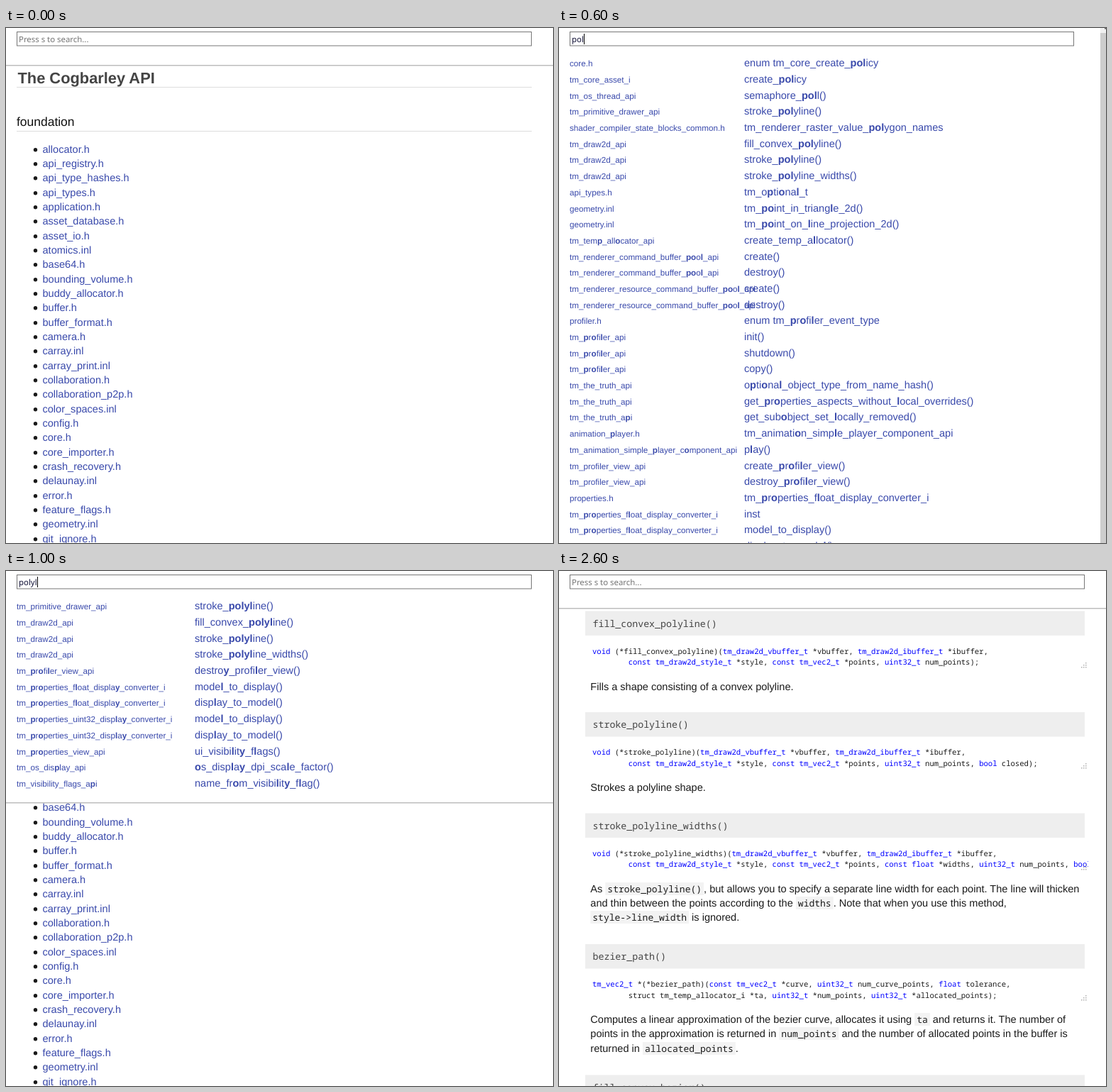
An HTML page that plays this animation: 771 by 726 pixels, repeating every 4600 ms.

```html
<!DOCTYPE html>
<html lang="en">
<head>
<meta charset="utf-8">
<title>API search</title>
<style>
html, body { margin: 0; width: 100%; height: 100%; overflow: hidden; background: #fff; }
svg { display: block; }
text { font: 14.56px "Liberation Sans", Arial, sans-serif; white-space: pre; text-rendering: geometricPrecision; fill: #1a1a1a; }
.link, .small { fill: #3949ab; }
.small { font-size: 11.68px; }
.title { font-size: 21.84px; font-weight: 700; fill: #444; }
.section { font-size: 17.47px; fill: #111; }
.field { font: 11.4px "Noto Sans", "Open Sans", sans-serif; fill: #15153a; }
.hint { fill: #757575; }
.head, .code, .inline { font-family: "Noto Sans Mono", "DejaVu Sans Mono", monospace; }
.head { font-size: 13.28px; fill: #444; }
.code { font-size: 10.575px; }
.inline { font-size: 13.03px; }
.type { fill: #00f; }
.hit { font-weight: 700; }
</style>
</head>
<body>
<svg id="stage" width="771" height="726" viewBox="0 0 771 726">
<defs><clipPath id="codeClip"><rect width="746" height="726"/></clipPath></defs>
<g id="view"></g>
</svg>
<script>
const view = document.getElementById("view");
const LOOP = 4600;

const files = `allocator.h api_registry.h api_type_hashes.h api_types.h application.h
asset_database.h asset_io.h atomics.inl base64.h bounding_volume.h buddy_allocator.h buffer.h
buffer_format.h camera.h carray.inl carray_print.inl collaboration.h collaboration_p2p.h
color_spaces.inl config.h core.h core_importer.h crash_recovery.h delaunay.inl error.h
feature_flags.h geometry.inl git_ignore.h`.split(/\s+/);

// Each line: owner|symbol|symbol...
const results = {
p: `allocator.h|tm_temp_allocator_i
tm_temp_allocator_api|create_temp_allocator()|printf()
api_registry.h|tm_api_registry_api
tm_api_registry_api|implementation()|first_implementation()|next_implementation()
api_types.h|tm_optional_t
application.h|tm_application_api
tm_application_api|application()|update_loop()
atomics.inl|atomic_exchange_pointer()|atomic_compare_exchange_weak_pointer()
carray.inl|tm_carray_push()|tm_carray_pop()|tm_carray_temp_push()
carray_print.inl|tm_carray_printf()|tm_carray_temp_printf()
core.h|enum tm_core_create_policy
tm_core_asset_i|create_policy
geometry.inl|tm_point_segment_distance_2d()|tm_point_in_triangle_2d()|tm_point_distance_2d()|tm_point_on_line_projection_2d()
tm_os_file_io_api|open_input()|open_output()|set_position()
tm_os_thread_api|semaphore_poll()|sleep()|processor_id()`,
po: `atomics.inl|atomic_exchange_pointer()|atomic_compare_exchange_weak_pointer()
carray.inl|tm_carray_pop()
core.h|enum tm_core_create_policy
tm_core_asset_i|create_policy
geometry.inl|tm_point_segment_distance_2d()|tm_point_in_triangle_2d()|tm_point_distance_2d()|tm_point_on_line_projection_2d()
tm_os_file_io_api|set_position()
tm_os_thread_api|semaphore_poll()
tm_the_truth_common_types_api|get_position()|set_position()
animation_blender.h|tm_animation_pose_t
tm_animation_blender_api|play_pose()|update_pose()|blend_compute_pose()|blend_pose()
animation_player.h|tm_animation_player_playing_o
tm_animation_state_machine_api|pose()
mixer.h|enum tm_mixer_positioning_enum|tm_mixer_positioning_2d_t|tm_mixer_positioning_3d_t|tm_mixer_positioning_matrix_t|tm_mixer_positioning_t
tm_mixer_api|positioning()|set_positioning()
tm_properties_view_api|ui_uint32_popup_picker()|ui_uint64_popup_picker()|ui_reference_popup_picker()|ui_string_popup_picker()`,
pol: `core.h|enum tm_core_create_policy
tm_core_asset_i|create_policy
tm_os_thread_api|semaphore_poll()
tm_primitive_drawer_api|stroke_polyline()
shader_compiler_state_blocks_common.h|tm_renderer_raster_value_polygon_names
tm_draw2d_api|fill_convex_polyline()|stroke_polyline()|stroke_polyline_widths()
api_types.h|tm_optional_t
geometry.inl|tm_point_in_triangle_2d()|tm_point_on_line_projection_2d()
tm_temp_allocator_api|create_temp_allocator()
tm_renderer_command_buffer_pool_api|create()|destroy()
tm_renderer_resource_command_buffer_pool_api|create()|destroy()
profiler.h|enum tm_profiler_event_type
tm_profiler_api|init()|shutdown()|copy()
tm_the_truth_api|optional_object_type_from_name_hash()|get_properties_aspects_without_local_overrides()|get_subobject_set_locally_removed()
animation_player.h|tm_animation_simple_player_component_api
tm_animation_simple_player_component_api|play()
tm_profiler_view_api|create_profiler_view()|destroy_profiler_view()
properties.h|tm_properties_float_display_converter_i
tm_properties_float_display_converter_i|inst|model_to_display()|display_to_model()`,
poly: `tm_primitive_drawer_api|stroke_polyline()
shader_compiler_state_blocks_common.h|tm_renderer_raster_value_polygon_names
tm_draw2d_api|fill_convex_polyline()|stroke_polyline()|stroke_polyline_widths()
core.h|enum tm_core_create_policy
tm_core_asset_i|create_policy
tm_renderer_command_buffer_pool_api|destroy()
tm_renderer_resource_command_buffer_pool_api|destroy()
profiler.h|enum tm_profiler_event_type
tm_profiler_api|copy()
tm_the_truth_api|optional_object_type_from_name_hash()|get_subobject_set_locally_removed()
tm_animation_simple_player_component_api|play()
dcc_asset_truth.h|tm_tt_prop__dcc_asset_node_animation__float_key_t
tm_profiler_view_api|destroy_profiler_view()
properties.h|tm_properties_float_display_converter_i
tm_properties_float_display_converter_i|inst|model_to_display()|display_to_model()|get_spinner_settings()
properties.h|tm_properties_uint32_display_converter_i
tm_properties_uint32_display_converter_i|inst|model_to_display()|display_to_model()
tm_properties_aspect_i|get_type_display_name()|get_display_name()
tm_properties_view_api|get_type_display_name()|get_display_name()|ui_visibility_flags()|interpolate_display_model_state()`,
polyl: `tm_primitive_drawer_api|stroke_polyline()
tm_draw2d_api|fill_convex_polyline()|stroke_polyline()|stroke_polyline_widths()
tm_profiler_view_api|destroy_profiler_view()
tm_properties_float_display_converter_i|model_to_display()|display_to_model()
tm_properties_uint32_display_converter_i|model_to_display()|display_to_model()
tm_properties_view_api|ui_visibility_flags()
tm_os_display_api|os_display_dpi_scale_factor()
tm_visibility_flags_api|name_from_visibility_flag()`
};

const docs = [
  { y: 56.5, name: "fill_convex_polyline()", code: [
    "void (*fill_convex_polyline)(tm_draw2d_vbuffer_t *vbuffer, tm_draw2d_ibuffer_t *ibuffer,",
    "const tm_draw2d_style_t *style, const tm_vec2_t *points, uint32_t num_points);"],
    body: ["Fills a shape consisting of a convex polyline."] },
  { y: 199, name: "stroke_polyline()", code: [
    "void (*stroke_polyline)(tm_draw2d_vbuffer_t *vbuffer, tm_draw2d_ibuffer_t *ibuffer,",
    "const tm_draw2d_style_t *style, const tm_vec2_t *points, uint32_t num_points, bool closed);"],
    body: ["Strokes a polyline shape."] },
  { y: 341.5, name: "stroke_polyline_widths()", code: [
    "void (*stroke_polyline_widths)(tm_draw2d_vbuffer_t *vbuffer, tm_draw2d_ibuffer_t *ibuffer,",
    "const tm_draw2d_style_t *style, const tm_vec2_t *points, const float *widths, uint32_t num_points, bool closed);"],
    body: ["As `stroke_polyline()`, but allows you to specify a separate line width for each point. The line will thicken",
      "and thin between the points according to the `widths`. Note that when you use this method,",
      "`style->line_width` is ignored."] },
  { y: 526, name: "bezier_path()", code: [
    "tm_vec2_t *(*bezier_path)(const tm_vec2_t *curve, uint32_t num_curve_points, float tolerance,",
    "struct tm_temp_allocator_i *ta, uint32_t *num_points, uint32_t *allocated_points);"],
    body: ["Computes a linear approximation of the bezier curve, allocates it using `ta` and returns it. The number of",
      "points in the approximation is returned in `num_points` and the number of allocated points in the buffer is",
      "returned in `allocated_points`."] },
  { y: 710.5, name: "fill_convex_bezier()", code: [], body: [] }
];
const types = /\b(void|const|bool|float|uint32_t|tm_draw2d_\w+_t|tm_vec2_t)\b/;

const scenes = [
  { at: 0, page: home },
  { at: 200, page: home, query: "p", caret: true },
  { at: 400, page: home, query: "po", caret: true },
  { at: 600, page: home, query: "pol", caret: true },
  { at: 800, page: home, query: "poly" },
  { at: 1000, page: home, query: "polyl", caret: true },
  { at: 1400, page: home, query: "polyl", pick: 0 },
  { at: 1800, page: home, query: "polyl", pick: 1 },
  { at: 2600, page: manual }
];

function add(tag, attrs, parent = view) {
  const el = document.createElementNS("http://www.w3.org/2000/svg", tag);
  for (const key in attrs) el.setAttribute(key, attrs[key]);
  return parent.appendChild(el);
}
const box = (x, y, width, height, fill) => add("rect", { x, y, width, height, fill });

// runs: a string, or a list of [string, class] pairs
function label(x, y, cls, runs) {
  const el = add("text", { x, y, class: cls });
  if (typeof runs === "string") el.textContent = runs;
  else for (const [str, c] of runs) add("tspan", { class: c }, el).textContent = str;
  return el;
}
const widthOf = el => el.getComputedTextLength();

function home() {
  label(16.5, 78, "title", "The Cogbarley API");
  box(15, 83, 726, 1, "#ddd");
  label(15, 138, "section", "foundation");
  box(15, 145, 726, 1, "#ddd");
  files.forEach((name, i) => {
    const y = Math.round(175.6 + 20.34 * i);
    add("circle", { cx: 41.5, cy: y - 4.3, r: 2.7, fill: "#1a1a1a" });
    label(51.5, y, "link", name);
  });
}

function paragraph(x, y, str) {
  str.split("`").forEach((part, i) => {
    if (!part) return;
    const inline = i % 2;
    const back = inline && box(x, y - 14, 0, 18, "#f3f3f3");
    const w = widthOf(label(x + (inline ? 3 : 0), y, inline ? "inline" : "", part)) + (inline ? 6 : 0);
    if (back) back.setAttribute("width", w);
    x += w;
  });
}

function manual() {
  for (const { y, name, code, body } of docs) {
    box(37, y, 704, 34.5, "#eee");
    label(47.5, Math.round(y + 22.3), "head", name);
    code.forEach((line, i) => {
      const runs = line.split(types).map((s, k) => [s, k % 2 ? "type" : ""]);
      const el = label(47 + i * 8 * 6.345, Math.round(y + 60 + i * 15.8), "code", runs);
      el.setAttribute("clip-path", "url(#codeClip)");
    });
    if (code.length) grip(743, Math.round(y + 78));
    body.forEach((line, i) => paragraph(44.3, Math.round(y + 111 + i * 20.4), line));
  }
}

function grip(x, y) {
  for (let r = 0; r < 3; r++)
    for (let c = 0; c <= r; c++) box(x - 1 - 3 * c, y - 6 + 3 * r, 1.5, 1.5, "#b0b0b0");
}

// Indices of the letters of query in str, taken in order
function letters(str, query) {
  const word = str.search(new RegExp("(?<![a-z0-9])" + query[0]));
  for (const start of [word, 0]) {
    if (start < 0) continue;
    const found = [];
    let from = start;
    for (const ch of query) {
      const at = str.indexOf(ch, from);
      if (at < 0) break;
      found.push(at);
      from = at + 1;
    }
    if (found.length === query.length) return found;
  }
  return null;
}

function match(left, right, query) {
  const whole = right.indexOf(query), shift = left.length;
  if (whole >= 0) return [...query].map((_, i) => shift + whole + i);
  const own = letters(right, query);
  return own ? own.map(i => i + shift) : letters(left + right, query) || [];
}

function emphasise(str, offset, hits) {
  const runs = [];
  [...str].forEach((ch, i) => {
    const cls = hits.includes(offset + i) ? "hit" : "";
    const last = runs[runs.length - 1];
    if (last && last[1] === cls) last[0] += ch;
    else runs.push([ch, cls]);
  });
  return runs;
}

function list(query, pick, column) {
  const rows = results[query].split("\n").flatMap(line => {
    const [left, ...symbols] = line.split("|");
    return symbols.map(right => [left, right]);
  });
  rows.slice(0, 31).forEach(([left, right], i) => {
    const y = Math.round(54.3 + 22.69 * i);
    const hits = match(left, right, query);
    const back = i === pick && box(15, y - 12, 0, 15, "#ffffaa");
    const el = label(column, y, "link", emphasise(right, left.length, hits));
    label(15, y, "small", emphasise(left, 0, hits));
    if (back) back.setAttribute("width", column - 15 + widthOf(el));
  });
}

function panel({ query, caret, pick }) {
  const full = query && query.length < 5;
  const bottom = full ? 726 : query ? 326 : 52;
  box(0, 0, 771, bottom, "#fff");
  if (!full) box(0, bottom, 771, 1.5, "#bdbdbd");
  add("rect", { x: 15.5, y: 5.5, width: full ? 710 : 725, height: 19.5, fill: "#fff", stroke: "#767676" });
  const typed = label(18, 20, query ? "field" : "field hint", query || "Press s to search...");
  if (caret) box(Math.round(18 + widthOf(typed)), 8, 1, 15, "#000");
  if (query) list(query, pick, full ? 261 : 266);
  if (full) {
    box(763, 0, 8, 726, "#f1f1f1");
    box(763, 7, 8, 719, "#cdcdcd");
    box(769, 0, 2, 1.5, "#606060");
  }
}

let shown = null;
function frame(now) {
  const t = now % LOOP;
  const scene = scenes.filter(s => s.at <= t).pop();
  if (scene !== shown) {
    shown = scene;
    view.replaceChildren();
    scene.page();
    panel(scene);
  }
  requestAnimationFrame(frame);
}
frame(0);
</script>
</body>
</html>
```
